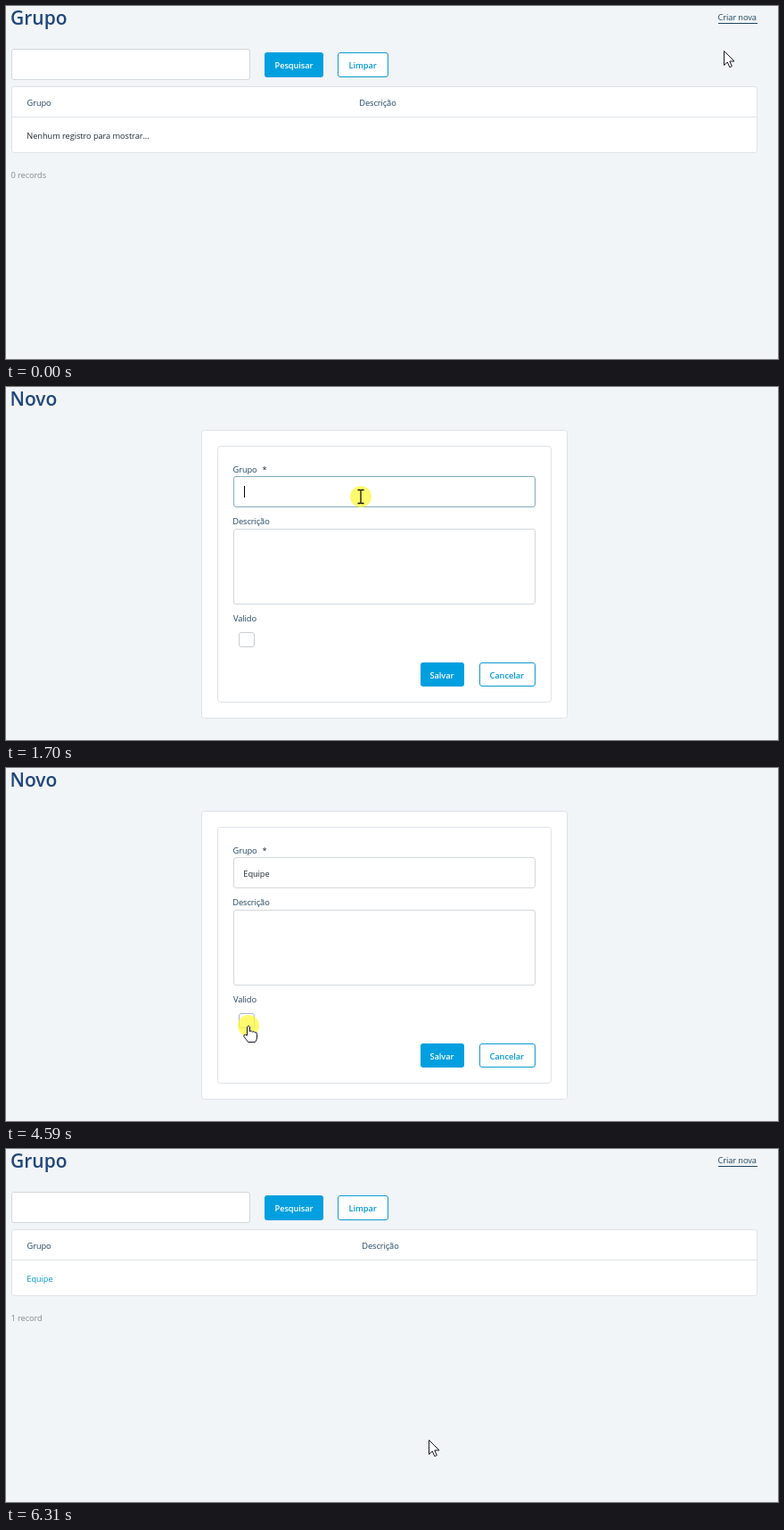
Animation of 866x396 px, one loop 6540 ms. Source, as an HTML page:

```html
<!DOCTYPE html>
<html lang="pt">
<head>
<meta charset="utf-8">
<title>Grupo</title>
<style>
  html, body { margin: 0; width: 100%; height: 100%; overflow: hidden; background: #f2f5f8; }
  svg { display: block; width: 100%; height: 100%; }
  text { font: 400 9.3px "Open Sans", "Noto Sans", sans-serif; letter-spacing: -.09px; fill: #1f4560; white-space: pre; }
  .title { font-size: 21px; font-weight: 600; letter-spacing: 0; fill: #21477a; }
  .box { fill: #fff; stroke: #dee2e6; }
  .field { fill: #fff; stroke: #d3d8dc; }
  .fill { fill: #009fdf; }
  .ghost { fill: #fff; stroke: #0b9ad3; }
  .bold { font-weight: 600; }
  .white { fill: #fff; }
  .blue { fill: #0097d6; }
  .dark { fill: #222b33; }
  .muted { fill: #878a8e; }
  .pointer { fill: #fff; stroke: #15152a; stroke-linejoin: round; }
</style>
</head>
<body>
<svg viewBox="0 0 866 396">
  <g id="list">
    <text class="title" x="5" y="21">Grupo</text>
    <g id="link">
      <text x="798.5" y="16" style="fill:inherit">Criar nova</text>
      <rect x="799" y="19" width="44" height="1"/>
    </g>
    <rect class="field" x="6.5" y="48.5" width="267" height="34" rx="2.5"/>
    <rect class="fill" x="290" y="52" width="66" height="28" rx="3"/>
    <text class="bold white" x="301.5" y="70">Pesquisar</text>
    <rect class="ghost" x="372.5" y="52.5" width="56" height="27" rx="2.5"/>
    <text class="bold blue" x="384.5" y="70">Limpar</text>
    <rect class="box" x="6.5" y="90.5" width="836" height="74" rx="3"/>
    <path d="M7 124.5H842" stroke="#dee2e6"/>
    <text x="23.5" y="112">Grupo</text>
    <text id="column" y="112">Descrição</text>
    <text id="row" x="23.3" y="149"></text>
    <text id="count" class="muted" x="5.5" y="193"></text>
  </g>

  <g id="form">
    <text class="title" x="4.5" y="21">Novo</text>
    <rect class="box" x="219.5" y="48.5" width="410" height="323" rx="3"/>
    <rect class="box" x="237.5" y="66.5" width="374" height="287" rx="3"/>
    <text x="254.5" y="96">Grupo</text>
    <text class="dark" x="287.5" y="96">*</text>
    <rect id="name" class="field" x="255.5" y="100.5" width="338" height="34" rx="2.5"/>
    <text id="typed" class="dark" x="266.3" y="122"></text>
    <rect id="caret" y="111" width="1" height="13" fill="#000"/>
    <text x="254.3" y="154">Descrição</text>
    <rect id="notes" class="field" x="255.5" y="159.5" width="338" height="84" rx="2.5"/>
    <text x="255" y="263">Valido</text>
    <rect id="check" x="261.5" y="275.5" width="17" height="16" rx="2.5"/>
    <path id="tick" d="M265.5 283.8l3 3 6-6.3" fill="none" stroke="#fff" stroke-width="2"/>
    <rect id="save" class="fill" x="465" y="309" width="49" height="27" rx="3"/>
    <text class="bold white" x="475.5" y="327">Salvar</text>
    <rect class="ghost" x="531.5" y="309.5" width="62" height="26" rx="2.5"/>
    <text class="bold blue" x="542.5" y="327">Cancelar</text>
  </g>

  <g id="cursor">
    <circle id="halo" r="12" fill="#fdf83c" fill-opacity=".75"/>
    <path id="arrow" class="pointer" d="M.5 .5V16.5L4.3 13 6.8 18.7 9.3 17.6 6.8 12H12Z"/>
    <path id="beam" d="M-3.5 -7.5H-1L0 -7 1 -7.5H3.5M0 -7V7M-3.5 7.5H-1L0 7 1 7.5H3.5" fill="none" stroke="#111" stroke-width="1.3"/>
    <path id="hand" class="pointer" d="M-1.5 11V1.5Q0 -1 1.5 1.5V6.5Q3.5 5 4.5 7 6.5 5.8 7.3 7.8 9.5 7 9.5 9.5V13Q9.5 16 7.5 18.5H-.5Q-2 16 -5 12.5 -6 10 -3.5 10Z"/>
  </g>
</svg>
<script>
const LOOP = 6540, FORM_OPENS = 1000, FORM_CLOSES = 6310;
const FOCUS = 1700, BLUR = 4530, SAVE = 5530, BLINK = 530;
const WORD = 'Equipe';
const KEYS = [2320, 2410, 2580, 2640, 2870, 2890];
const CLICKS = [[480, 700], [FOCUS, 1850], [BLUR, 4680], [SAVE, 5770]];

// Each move: first and last step time, number of steps, start, control and end point
const MOVES = [
  [70, 310, 4, [805, 50], [814, 30], [821, 13]],
  [1000, 1620, 9, [821, 13], [624, 160], [398, 123]],
  [3820, 4440, 9, [398, 123], [309, 297], [272, 289]],
  [4750, 5360, 9, [272, 289], [296, 294], [474, 326]]
];

const AREAS = {
  link: [799, 5, 843, 20],
  name: [255, 100, 594, 135],
  notes: [255, 159, 594, 244],
  check: [261, 275, 279, 292],
  save: [465, 309, 514, 336]
};

const el = {};
document.querySelectorAll('[id]').forEach(node => el[node.id] = node);
const show = (node, on) => node.style.display = on ? '' : 'none';
const paint = (node, prop, value) => node.style[prop] = value;
const onForm = t => t >= FORM_OPENS && t < FORM_CLOSES;

function pointerAt(t) {
  const move = MOVES.filter(m => m[0] <= t).pop();
  if (!move) return MOVES[0][3];
  const [start, end, steps, a, c, b] = move;
  const step = Math.floor((t - start) / (end - start) * (steps - 1)) + 1;
  const p = Math.min(1, step / steps), s = p * p * (3 - 2 * p);
  return a.map((v, i) => Math.round((1 - s) ** 2 * v + 2 * s * (1 - s) * c[i] + s * s * b[i]));
}

function areaAt(t) {
  const [x, y] = pointerAt(t);
  return Object.keys(AREAS).find(key => {
    const [left, top, right, bottom] = AREAS[key];
    return (key !== 'link') === onForm(t) && x >= left && x < right && y >= top && y < bottom;
  });
}

function drawList(t) {
  const saved = t >= FORM_CLOSES;
  el.column.setAttribute('x', saved ? 399.3 : 396.3);
  el.row.textContent = saved ? WORD : 'Nenhum registro para mostrar...';
  el.row.setAttribute('class', saved ? 'blue' : 'dark');
  el.count.textContent = saved ? '1 record' : '0 records';
  paint(el.link, 'fill', areaAt(t) === 'link' ? '#0b73ae' : '#1f4560');
}

function drawForm(t) {
  const hovered = key => areaAt(t) === key || areaAt(t - 90) === key;
  const focused = t >= FOCUS && t < BLUR;
  const focusStep = Math.min(2, Math.floor((t - FOCUS) / 75));
  paint(el.name, 'stroke', focused ? ['#82abbd', '#3fa3cc', '#009fdf'][focusStep]
    : hovered('name') ? '#b4babf' : '');
  paint(el.notes, 'stroke', hovered('notes') ? '#b4babf' : '');

  const pressed = KEYS.filter(k => k <= t);
  el.typed.textContent = WORD.slice(0, pressed.length);
  const width = pressed.length ? el.typed.getComputedTextLength() : 0;
  el.caret.setAttribute('x', Math.round(267 + width));
  const lastInput = pressed.pop() || FOCUS;
  show(el.caret, focused && Math.floor((t - lastInput) / BLINK) % 2 === 0);

  const checked = t >= BLUR + 75, ring = checked && t < SAVE;
  show(el.tick, checked);
  paint(el.check, 'fill', ring ? '#078fcd' : checked ? '#009fdf' : '#fff');
  paint(el.check, 'stroke', ring ? '#6fa9c8' : checked ? '#009fdf' : hovered('check') ? '#adb5bd' : '#c9cdd1');
  paint(el.save, 'fill', areaAt(t) === 'save' ? '#058fca' : '');
}

function drawCursor(t) {
  const [x, y] = pointerAt(t), area = areaAt(t);
  const text = area === 'name' || area === 'notes';
  el.cursor.setAttribute('transform', `translate(${x} ${y})`);
  show(el.halo, CLICKS.some(([from, to]) => t >= from && t < to));
  show(el.arrow, !area);
  show(el.beam, text);
  show(el.hand, area && !text);
}

function frame(now) {
  const t = now % LOOP, form = onForm(t);
  show(el.form, form);
  show(el.list, !form);
  (form ? drawForm : drawList)(t);
  drawCursor(t);
}

const origin = performance.now();
function tick() {
  frame(performance.now() - origin);
  requestAnimationFrame(tick);
}
tick();
</script>
</body>
</html>
```
